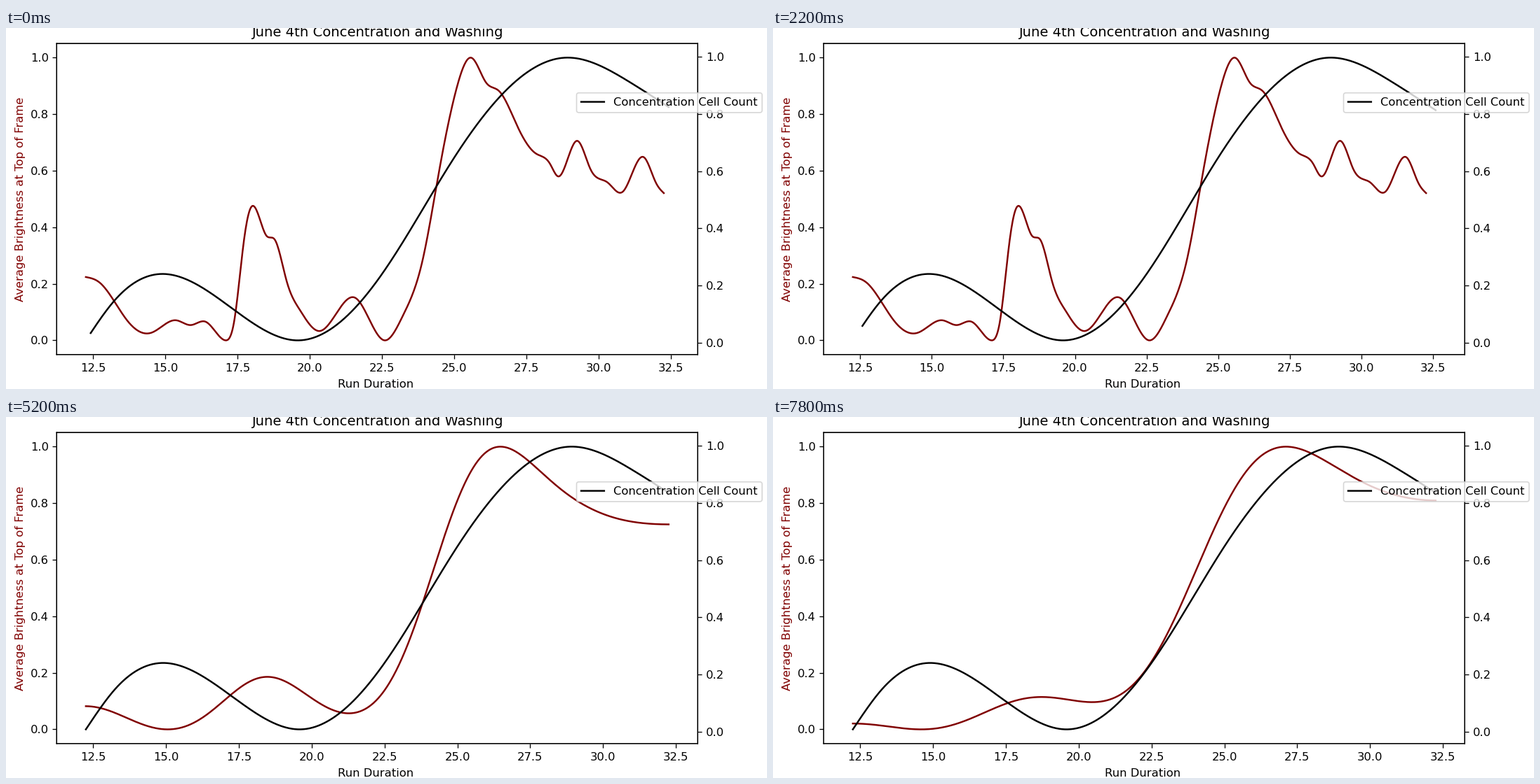
A matplotlib script that plays this animation: 1085 px wide and 516 px high, repeating every 8 s.

```python
import numpy as np
import matplotlib.pyplot as plt
from matplotlib.animation import FuncAnimation

W, H, DPI = 1085, 516, 128
SCALE = 118 / DPI
PIXEL = 72 / DPI                # one pixel in points
FRAMES, INTERVAL = 40, 200
CYCLE = 11                      # one shifted view, then ten smoothed ones
START, SPAN = 12.25, 20.0
SHIFT = 1 / 6                   # the cell count window moves ten seconds per cycle
SIGMA = 0.285                   # smoothing width of the sharpest curve, minutes
STEP = 0.025
LOW, RISE = 0.0085, 0.988       # cell count range on the right axis

plt.rcParams.update({
    "font.family": "DejaVu Sans",
    "font.size": 10 * SCALE,
    "axes.titlesize": 12 * SCALE,
    "axes.titlepad": 6 * SCALE,
    "axes.labelpad": 4 * SCALE,
    "axes.linewidth": 0.8 * SCALE,
    "lines.linewidth": 1.5 * SCALE,
    "patch.linewidth": 1.0 * SCALE,
    "path.snap": False,
})
for axis in ("xtick", "ytick"):
    plt.rcParams.update({
        f"{axis}.major.size": 3.5 * SCALE,
        f"{axis}.major.pad": 3.5 * SCALE,
        f"{axis}.major.width": 0.8 * SCALE,
    })

# Turning points and shoulders: minutes, level.
BRIGHT = [
    (12.25, .224), (12.72, .205), (13.69, .069), (14.52, .027), (15.37, .071),
    (15.88, .054), (16.39, .066), (17.08, 0), (17.38, .066), (17.72, .353),
    (17.99, .474), (18.5, .37), (18.79, .356), (19.2, .209), (19.64, .11),
    (20.34, .033), (21.58, .15), (22.58, 0), (23.21, .085), (23.89, .278),
    (24.45, .585), (25.1, .9), (25.59, 1), (26.1, .912), (26.53, .884),
    (27.19, .756), (27.84, .66), (28.31, .625), (28.6, .58), (29.25, .706),
    (29.71, .606), (30.3, .559), (30.83, .526), (31.56, .648), (31.97, .559),
    (32.25, .521)]
COUNT = [
    (12.25, 0), (13.25, .142), (14.91, .235), (17.3, .114), (19.6, 0),
    (22.5, .235), (25, .647), (28.85, 1), (31, .918), (33, .786)]


def spline(points, x):
    """Natural cubic spline through the points."""
    xk, yk = np.array(points, float).T
    n, h = len(xk), np.diff(xk)
    slope = np.diff(yk) / h
    a, b = np.eye(n), np.zeros(n)
    for i in range(1, n - 1):
        a[i, i - 1:i + 2] = h[i - 1], 2 * (h[i - 1] + h[i]), h[i]
        b[i] = 6 * (slope[i] - slope[i - 1])
    m = np.linalg.solve(a, b)
    i = np.clip(np.searchsorted(xk, x) - 1, 0, n - 2)
    t, u = x - xk[i], xk[i + 1] - x
    return ((m[i] * u**3 + m[i + 1] * t**3) / (6 * h[i])
            + (yk[i] / h[i] - m[i] * h[i] / 6) * u
            + (yk[i + 1] / h[i] - m[i + 1] * h[i] / 6) * t)


def normalise(v):
    return (v - v.min()) / (v.max() - v.min())


def smooth(v, sigma):
    """Gaussian filter with mirrored ends."""
    if sigma == 0:
        return v
    r = int(4 * sigma / STEP)
    kernel = np.exp(-0.5 * (np.arange(-r, r + 1) * STEP / sigma) ** 2)
    padded = np.pad(v, r, mode="symmetric")
    return np.convolve(padded, kernel / kernel.sum(), mode="valid")


time = START + np.arange(int(SPAN / STEP) + 1) * STEP
sharp = normalise(spline(BRIGHT, time))
curves = [normalise(smooth(sharp, SIGMA * np.sqrt((p + 1) ** 2 - 1)))
          for p in range(CYCLE)]

fig = plt.figure(figsize=(W / DPI, H / DPI), dpi=DPI, facecolor="white")
left, right, top, bottom = 72.3, 986.3, 22.2, 466.7
ax = fig.add_axes([left / W, 1 - bottom / H,
                   (right - left) / W, (bottom - top) / H])
ax.set_title("June 4th Concentration and Washing")
ax.set_xlabel("Run Duration", x=0.4975, labelpad=4 * SCALE + 0.8 * PIXEL)
ax.set_ylabel("Average Brightness at Top of Frame", color="maroon")
ax.tick_params(axis="x", pad=3.5 * SCALE + PIXEL)
ax.set_ylim(-0.05, 1.05)
bright, = ax.plot([], [], color="maroon")

ax2 = ax.twinx()
ax2.set_ylim(LOW - 0.05 * RISE, LOW + 1.05 * RISE)
count, = ax2.plot([], [], color="black", label="Concentration Cell Count")
ax2.legend(loc="center left", bbox_to_anchor=(813.5 / W, 1 - 106.8 / H),
           bbox_transform=fig.transFigure, borderaxespad=0)


def draw(frame):
    cycle, phase = divmod(frame, CYCLE)
    shift = 0 if phase else SHIFT * (cycle + 1)
    bright.set_data(time, curves[phase])
    window = time + shift
    count.set_data(window, LOW + RISE * spline(COUNT, window))
    margin = 0.05 * (SPAN + shift)
    ax.set_xlim(START - margin, START + SPAN + shift + margin)
    return bright, count


anim = FuncAnimation(fig, draw, frames=FRAMES, interval=INTERVAL,
                     repeat=True, repeat_delay=0, blit=False)
plt.show()
```
